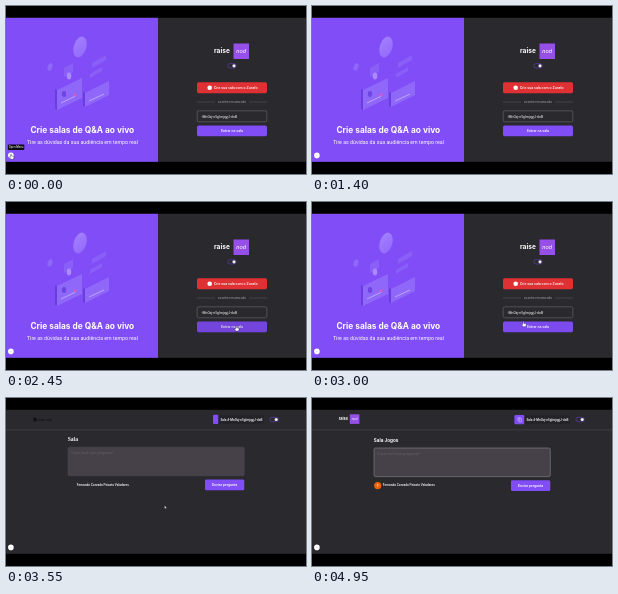
These frames come from a looping animation (300 by 168 pixels, 5 s). An HTML page:

```html
<!DOCTYPE html>
<html lang="pt-BR">
<head>
<meta charset="utf-8">
<title>Salas de perguntas</title>
<style>
  html, body { margin: 0; width: 100%; height: 100%; overflow: hidden; background: #000; }
  svg { display: block; width: 100%; height: 100%; }
  text { font-family: Roboto, sans-serif; fill: #fff; }
  .brand { font-family: Inter, sans-serif; font-weight: 700; }
  .serif { font-family: "Liberation Serif", serif; font-weight: 700; }
  .mid { text-anchor: middle; }
  .med { font-weight: 500; }
  .purple { fill: #804df6; }
  .mark { fill: #9650e8; }
  .cursor { stroke: #111; stroke-width: .35; fill: #fff; }
</style>
</head>
<body>
<svg viewBox="0 0 300 168">
  <defs>
    <g id="toggle">
      <rect x=".3" y=".3" width="8.4" height="4.4" rx="2.2" fill="#29292e" stroke="#6a45c8" stroke-width=".55"/>
      <circle cx="6.5" cy="2.5" r="1.6" fill="#f0eef6"/>
    </g>
    <linearGradient id="planet" x2="1" y2="1">
      <stop stop-color="#a482ff"/>
      <stop offset="1" stop-color="#9168fa"/>
    </linearGradient>
  </defs>
  <rect y="11.8" width="300" height="144" fill="#29292e"/>

  <g id="home">
    <rect class="purple" y="11.8" width="152" height="144"/>
    <g id="art">
      <ellipse cx="74" cy="41" rx="6.3" ry="10.7" transform="rotate(17 74 41)" fill="url(#planet)"/>
      <g fill="#8f68f9">
        <ellipse cx="44" cy="61" rx="2.4" ry="3.8" transform="rotate(17 44 61)"/>
        <path d="M51 84l25-12v20l-25 12zM79 87l24-12v14l-24 12z"/>
      </g>
      <path d="M58 62l9-5v9l-9 5zM86 57l14-8v5l-14 8zM84 68l12-7v4l-12 7z" fill="#8a5ff8"/>
      <path d="M51 84l-2-1v20l2 1zM79 87l-2-1v14l2 1z" fill="#6a3edd"/>
      <ellipse cx="63" cy="70" rx="2.3" ry="3.4" fill="#a98aff"/>
      <ellipse cx="58" cy="88" rx="2.2" ry="3" fill="#6f44e2"/>
      <path d="M55 97l14-6.7M83 95l15-7" stroke="#c2adff" stroke-width=".9" fill="none"/>
      <circle cx="69" cy="89" r="1.4" fill="#d65cc4"/>
    </g>
    <text class="brand mid" x="76.3" y="127" font-size="8.35">Crie salas de Q&amp;A ao vivo</text>
    <text class="mid" x="76.5" y="137.6" font-size="5.25">Tire as dúvidas da sua audiência em tempo real</text>

    <text class="brand" x="208" y="47" font-size="6.6">raise</text>
    <rect class="mark" x="227.5" y="37.5" width="15.5" height="15.5"/>
    <text class="mid" x="235.2" y="47" font-size="6" font-style="italic">nod</text>
    <use href="#toggle" x="221.5" y="57.3"/>

    <rect x="191" y="76.2" width="70" height="11" rx="1.6" fill="#df3033"/>
    <circle cx="203.7" cy="81.7" r="2.3" fill="#fff"/>
    <text class="med" x="208" y="83" font-size="3.6">Crie sua sala com o Zunelo</text>
    <path d="M191 96h18M243 96h18" stroke="#77777f" stroke-width=".35"/>
    <text class="mid" x="226" y="97" font-size="2.9" style="fill:#a8a8b3">ou entre em uma sala</text>
    <rect x="191.2" y="104.8" width="69.6" height="11" rx="1.5" fill="#29292e" stroke="#8c8c93" stroke-width=".4"/>
    <text x="195.6" y="111.5" font-size="3.45">-MnOzj-n5gImjqyjJ-doB</text>
    <rect class="purple" x="191" y="119.4" width="70" height="10.8" rx="1.6"/>
    <text class="mid med" x="226" y="126" font-size="3.6">Entrar na sala</text>
    <rect id="hover" x="191" y="119.4" width="70" height="10.8" rx="1.6"/>
  </g>

  <g id="room">
    <path d="M0 31.8h300" stroke="#4b4b50" stroke-width=".6"/>
    <g id="loading">
      <rect x="27.3" y="19.7" width="3.4" height="3.6" fill="#111114"/>
      <text x="32" y="23" font-size="3.3" style="fill:#0c0c0e">raise nod</text>
      <rect class="purple" x="207" y="16.7" width="5.5" height="9.2" rx="1"/>
      <text class="serif" x="61.8" y="43.2" font-size="5.5">Sala</text>
    </g>
    <g id="loaded">
      <text class="brand" x="26.7" y="22.4" font-size="3.9">raise</text>
      <rect class="mark" x="37.8" y="16.3" width="9.6" height="9.6"/>
      <text class="mid" x="42.6" y="22.4" font-size="3.6" font-style="italic">nod</text>
      <rect class="purple" x="202.4" y="17" width="10" height="9.2" rx="1.3"/>
      <path d="M206 22.7v-3h2.5M207 20.8h2.4v3H207z" fill="none" stroke="#fff" stroke-width=".4"/>
      <text class="brand" x="61.8" y="43.8" font-size="4.6">Sala Jogos</text>
      <circle cx="65.7" cy="87.6" r="3.6" fill="#e8630a"/>
      <text class="mid" x="65.7" y="88.9" font-size="3.6">F</text>
    </g>
    <path d="M212.5 17h44q1.3 0 1.3 1.3v6.5q0 1.3-1.3 1.3h-44" fill="#242428"/>
    <text class="med" x="214.4" y="22.7" font-size="3.15">Sala #-MnOzj-n5gImjqyjJ-doB</text>
    <use href="#toggle" x="263.7" y="19"/>
    <g id="form">
      <rect id="question" x="62" y="49.2" width="176.3" height="28.6" rx="1.5" fill="#464149" stroke-width=".5"/>
      <text x="65.3" y="55.8" font-size="3.5" style="fill:#626068">O que você quer perguntar?</text>
      <path id="caret" d="M65.4 53.3v4" stroke="#fff" stroke-width=".4"/>
      <text class="med" x="70.8" y="87.7" font-size="3.15">Fernando Conrado Peixoto Valadares</text>
      <rect class="purple" x="199" y="81.5" width="39.3" height="10.8" rx="1.4"/>
      <text class="mid med" x="218.6" y="88.2" font-size="3.6">Enviar pergunta</text>
    </g>
  </g>

  <circle cx="4.9" cy="149.4" r="2.8" fill="#fff"/>
  <circle cx="4.9" cy="149.4" r=".4" fill="#99999f"/>
  <g id="tooltip">
    <rect x="1.9" y="138.4" width="16.4" height="5.6" rx=".9" fill="#0c0c0e"/>
    <text class="mid" x="10.1" y="142.2" font-size="2.9">Open Menu</text>
  </g>
  <path id="arrow" class="cursor" d="M0 0v3.2l.8-.7.6 1.2.6-.3-.6-1.2h1z"/>
  <path id="hand" class="cursor" d="M-.5 0q.5-.5 1 0v1.5l2 .5q.5.2.4.8l-.5 2H-.3l-1.4-2q0-.8.8-.4l.4.4z"/>
</svg>
<script>
const LOOP = 5000, ROOM_AT = 3550, LOADED_AT = 3700, FOCUS_AT = 4450;
const el = id => document.getElementById(id);
const show = (id, on) => el(id).style.display = on ? '' : 'none';
const ramp = (t, from, to) => Math.min(1, Math.max(0, (t - from) / (to - from)));
const ease = u => u * u * (3 - 2 * u);

// Pointer stops: time, x, y
const stops = [
  [0, 5, 148.5], [50, 5, 148.5], [600, 205, 111], [1200, 216, 111],
  [1700, 230.7, 123.4], [2250, 230.2, 124.2], [2850, 230.2, 124.2],
  [3300, 158.5, 107.6], [3900, 158.5, 107.6], [4250, 152, 68], [LOOP, 152, 68]
];

function pointerAt(t) {
  const i = stops.findIndex(s => s[0] > t);
  const [t0, x0, y0] = stops[i - 1], [t1, x1, y1] = stops[i];
  const u = ease(ramp(t, t0, t1));
  return [x0 + (x1 - x0) * u, y0 + (y1 - y0) * u];
}

const inside = (x, y, left, top, right, bottom) => x >= left && x <= right && y >= top && y <= bottom;

function render(t) {
  const inRoom = t >= ROOM_AT, loaded = t >= LOADED_AT, focused = t >= FOCUS_AT;
  show('home', !inRoom);
  show('room', inRoom);
  show('loading', !loaded);
  show('loaded', loaded);
  // The loaded title font is taller and pushes the form down
  el('form').setAttribute('transform', `translate(0 ${loaded ? .8 : 0})`);
  el('question').setAttribute('stroke', focused ? '#96949a' : '#4c4950');
  show('caret', focused && (t - FOCUS_AT) % 1000 < 500);
  el('tooltip').style.opacity = 1 - ramp(t, 50, 200);
  el('hover').style.opacity = .1 * ramp(t, 1850, 2050) * (1 - ramp(t, 2900, 3050));

  const [x, y] = pointerAt(t);
  const onText = inRoom ? inside(x, y, 62, 49, 238, 78) : inside(x, y, 191, 105, 261, 116);
  const onLink = inside(x, y, 2, 146, 8, 153) || !inRoom && inside(x, y, 191, 119, 261, 130);
  for (const id of ['arrow', 'hand']) el(id).setAttribute('transform', `translate(${x} ${y})`);
  show('hand', onLink);
  show('arrow', !onLink && !onText);
}

const start = performance.now();
function tick() {
  render((performance.now() - start) % LOOP);
  requestAnimationFrame(tick);
}
tick();
</script>
</body>
</html>
```
